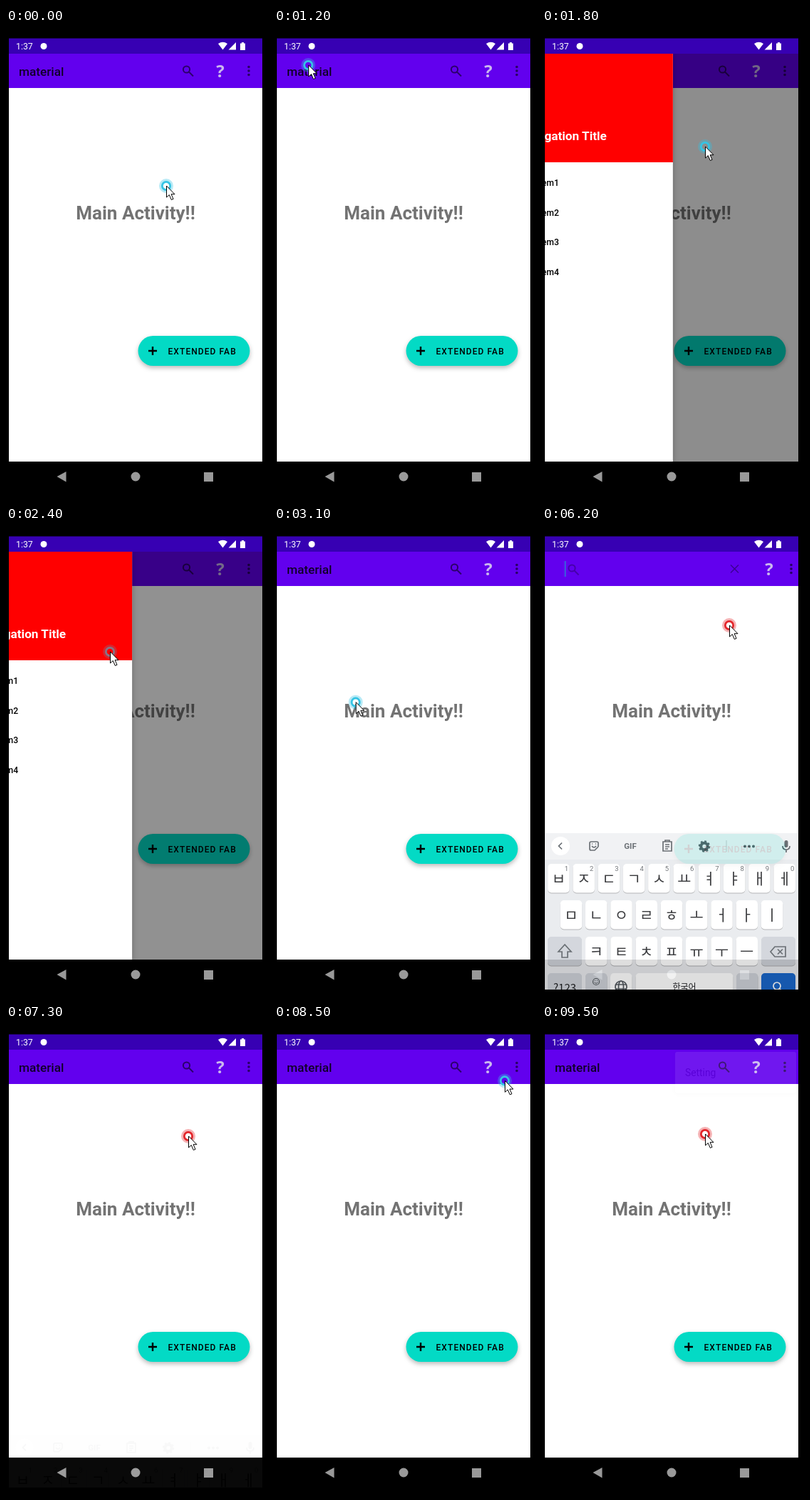
Recreate the animation shown at these times as an HTML page. Size 368 by 658 pixels, loop 9600 ms.

```html
<!DOCTYPE html>
<html lang="en">
<head>
<meta charset="utf-8">
<title>Material app demo</title>
<style>
  html, body { margin: 0; width: 100%; height: 100%; overflow: hidden; background: #000; }
  svg { display: block; width: 368px; height: 658px; font-family: Roboto, sans-serif; }
  .ko { font-family: "Noto Sans CJK KR", "Noto Sans CJK", sans-serif; font-weight: 500; }
  .line { fill: none; stroke: #555b61; stroke-width: 1.7; }
  .mid { text-anchor: middle; }
  #fab rect { filter: drop-shadow(0 3px 3px #0004); }
  #drawer, #popup { filter: drop-shadow(0 1px 4px #0004); }
  #keys .key { filter: drop-shadow(0 1px .5px #0004); }
</style>
</head>
<body>
<svg viewBox="0 0 368 658">
  <defs>
    <clipPath id="screen"><path d="M4 14H360V649H4Z"/></clipPath>
    <clipPath id="content"><path d="M4 36H360V607H4Z"/></clipPath>
    <g id="lens" fill="none" stroke="#000" stroke-width="2">
      <circle cx="-2" cy="-2" r="4.6"/><path d="M1.500 1.500L7.500 7.500"/>
    </g>
  </defs>
  <rect width="368" height="658"/>
  <g clip-path="url(#screen)">
    <path fill="#3700b3" d="M4 14.500H360V36H4Z"/>
    <g fill="#fff">
      <text x="14" y="30" font-size="12.300">1:37</text>
      <circle cx="53" cy="25.500" r="4.500"/>
      <path d="M298 22Q304.500 17.500 311 22L304.500 30.500ZM323 20V30.500H312.500ZM329 21.500H331V20H334V21.500H336V31H329Z"/>
    </g>
    <path fill="#6200ee" d="M4 36H360V84H4Z"/>
    <g id="bar">
      <text x="18" y="66.500" font-size="17.200" font-weight="500" opacity=".82">material</text>
      <use href="#lens" x="255.500" y="60" opacity=".55"/>
    </g>
    <g id="search">
      <path stroke="#03dac5" d="M32.500 49V71" opacity=".75"/>
      <use href="#lens" x="44" y="61" opacity=".28"/>
      <path d="M265 54.500L276 65.500M276 54.500L265 65.500" stroke="#000" stroke-width="1.500" opacity=".38"/>
    </g>
    <text id="help" class="mid" y="69" font-size="24" font-weight="700" fill="#cbb8ee" style="font-family:'Open Sans',sans-serif">?</text>
    <g id="dots" opacity=".58"><circle cy="54.500" r="1.800"/><circle cy="60" r="1.800"/><circle cy="65.500" r="1.800"/></g>
    <path fill="#fff" d="M4 84H360V607H4Z"/>
    <text class="mid" x="182" y="268" font-size="26" font-weight="700" fill="#737373">Main Activity!!</text>
    <g id="fab">
      <rect fill="#03dac5"/>
      <path id="plus" d="M-6 0H6M0-6V6" stroke="#000" stroke-width="2.400"/>
      <text x="227.500" y="457" font-size="12" font-weight="500" letter-spacing="1.07">EXTENDED FAB</text>
    </g>
    <path d="M4 607H360V649H4Z"/>
    <g fill="#999"><path d="M71.500 628L84.500 621V635.500ZM278 622H291V635H278Z"/><circle cx="182" cy="628" r="6.500"/></g>
    <g clip-path="url(#content)">
      <path id="scrim" d="M4 36H360V607H4Z"/>
      <g id="drawer">
        <path fill="#fff" d="M0 36H241V607H0Z"/>
        <path fill="#f00" d="M0 36H241V188H0Z"/>
        <text x="148" y="157" font-size="17.200" font-weight="700" fill="#fff" text-anchor="end">Navigation Title</text>
      </g>
    </g>
    <g id="popup">
      <rect x="187" y="39" width="170" height="58" rx="3" fill="#fff"/>
      <text x="201" y="73" font-size="13.800">Setting</text>
    </g>
    <g id="keys"><path fill="#e8eaed" d="M4 430H360V658H4Z"/><path fill="#f0f1f3" d="M4 430H360V467H4Z"/></g>
  </g>
  <g id="cursor">
    <g id="ring" fill="none"><circle r="7" stroke-width="6" opacity=".35"/><circle r="5.700" stroke-width="2.700"/></g>
    <path d="M.5 0V16L4.300 12.600L7.300 19.500L10 18.400L7.100 11.700H12Z" fill="#fff" stroke="#000" stroke-linejoin="round"/>
  </g>
</svg>
<script>
const LOOP = 9600, STEP = 100;
const el = id => document.getElementById(id);
const set = (node, attrs) => { for (const k in attrs) node.setAttribute(k, attrs[k]); };
const add = (parent, markup) => parent.insertAdjacentHTML("beforeend", markup);
const mix = (a, b, k) => a + (b - a) * k;
const ramp = (t, start, end) => Math.min(1, Math.max(0, (t - start) / (end - start)));
const pulse = (t, on, open, off, closed) => ramp(t, on, open) - ramp(t, off, closed);
const fab = el("fab"), pill = fab.querySelector("rect"), label = fab.querySelector("text");

// Places the pointer visits: time, x, y
const stops = [
  [0, 225, 221], [1100, 18, 33], [1800, 229, 166], [2200, 214, 176], [2400, 146, 176],
  [2900, 12, 120], [3500, 320, 500], [4500, 311, 448], [5100, 317, 454], [5800, 255, 60],
  [6200, 263, 139], [7100, 270, 60], [7300, 256, 157], [8800, 341, 60], [9500, 229, 154]
];

function pointerAt(t) {
  const i = Math.max(1, stops.findIndex(s => s[0] >= t));
  const [from, x0, y0] = stops[i - 1], [to, x1, y1] = stops[i], k = ramp(t, from, to);
  return [mix(x0, x1, k), mix(y0, y1, k)];
}

function key(x, y, w, text = "", fill = "#fff", size = 21) {
  add(el("keys"), `<rect class="key" x="${x}" y="${y}" width="${w}" height="40.5" rx="5" fill="${fill}"/>
    <text class="ko mid" x="${x + w / 2}" y="${y + 20 + size * .37}" font-size="${size}" fill="#202124">${text}</text>`);
}

function buildKeyboard() {
  const keys = el("keys"), grey = "#ced2d8", pitch = 35.25;
  ["ㅂㅈㄷㄱㅅㅛㅕㅑㅐㅔ", "ㅁㄴㅇㄹㅎㅗㅓㅏㅣ", "ㅋㅌㅊㅍㅠㅜㅡ"].forEach((row, r) =>
    [...row].forEach((letter, i) => {
      const x = 182 + (i - row.length / 2) * pitch + 2.4;
      key(x, 473 + r * 51, 30.5, letter);
      if (!r) add(keys, `<text x="${x + 23.5}" y="483" font-size="9.5" fill="#5f6368">${(i + 1) % 10}</text>`);
    }));
  for (const x of [8, 308]) key(x, 575, 48, "", grey);
  key(8, 626, 48, "?123", grey, 15);
  key(61, 626, 30.5, "", grey);
  key(96, 626, 30.5);
  key(131.5, 626, 137, "한국어", "#fff", 12);
  key(273, 626, 30.5, ".", grey);
  key(308, 626, 48, "", "#1a66c8");
  add(keys, `
    <circle cx="26" cy="448" r="13" fill="#fff"/>
    <g class="line">
      <path d="M28 443.500L23.500 448L28 452.500M32 586L23 596H28V604H36V596H41Z"/>
      <path d="M79 449V444Q79 442 77 442H69Q67 442 67 444V452Q67 454 69 454H74L79 449M70 448Q73 452 76 448M70 445H71M75 445H76"/>
      <path d="M170 442H182V455H170ZM173 442V440H179V442M173 446H179M173 449H179M173 452H177"/>
      <circle cx="228" cy="448.500" r="4.700" stroke-width="4"/>
      <circle cx="228" cy="448.500" r="7" stroke-width="2.500" stroke-dasharray="2.750"/>
      <path d="M259 440V456" stroke="#c4c7ca" stroke-width="1"/>
      <path d="M338 448Q338 453 343 453T348 448M343 453V457"/>
      <path d="M321 596L327 589H342V603H327ZM331 592.500L338 599.500M338 592.500L331 599.500"/>
      <circle cx="76" cy="638" r="4.500" stroke-width="1.200"/><path d="M73.500 639Q76 642 78.500 639M74 636.500H75M77 636.500H78" stroke-width="1"/>
      <circle cx="111" cy="645" r="8"/><ellipse cx="111" cy="645" rx="3.500" ry="8"/><path d="M103.500 642H118.500M103.500 648H118.500"/>
      <g stroke="#fff"><circle cx="330" cy="644" r="5"/><path d="M334 648L339 653"/></g>
    </g>
    <rect x="340.500" y="440" width="5" height="10" rx="2.500" fill="#555b61"/>
    <g fill="#555b61"><circle cx="285" cy="448.500" r="2"/><circle cx="291" cy="448.500" r="2"/><circle cx="297" cy="448.500" r="2"/></g>
    <text class="mid" x="124" y="452" font-size="11.500" font-weight="700" fill="#555b61">GIF</text>`);
}

function buildDrawer() {
  for (let i = 0; i < 4; i++)
    add(el("drawer"), `<text x="81" y="${221 + i * 41.7}" font-size="12.200" font-weight="500" text-anchor="end">Item${i + 1}</text>`);
}

function drawFab(collapsed) {
  const x = mix(185.5, 294, collapsed), h = mix(42, 48.5, collapsed);
  set(pill, { x, y: 431, width: 342.5 - x, height: h, rx: h / 2 });
  set(el("plus"), { transform: `translate(${mix(206, 318, collapsed)} ${431 + h / 2})` });
  set(label, { opacity: Math.max(0, 1 - 3 * collapsed) });
}

function draw(t) {
  const searching = t >= 5900 && t < 7200;
  set(el("bar"), { opacity: searching ? 0 : 1 });
  set(el("search"), { opacity: searching ? 1 : 0 });
  set(el("help"), { x: searching ? 319 : 301 });
  set(el("dots"), { transform: `translate(${searching ? 350 : 341})` });

  const collapsed = pulse(t, 3900, 4200, 4700, 5000);
  drawFab(collapsed);

  const open = pulse(t, 1300, 1970, 2200, 2910);
  set(el("scrim"), { opacity: .6 * open });
  set(el("drawer"), { transform: `translate(${4 + 241 * (open - 1)})`, opacity: open > 0 ? 1 : 0 });

  const leaving = ramp(t, 7100, 7307);
  set(el("keys"), { transform: `translate(0 ${150 * leaving})`, opacity: ramp(t, 6000, 6230) * (1 - leaving) });
  set(el("popup"), { opacity: pulse(t, 8800, 9000, 9400, 9510) });

  const clicked = t >= 5800 && t < 7600 || t >= 8700;
  set(el("cursor"), { transform: `translate(${pointerAt(t)})` });
  set(el("ring"), {
    stroke: clicked ? "#e3262b" : collapsed ? "#9af0f0" : "#35c4e4",
    opacity: 1 - .7 * collapsed - .4 * pulse(t, 2200, 2400, 2400, 2600)
  });
}

buildDrawer();
buildKeyboard();
function tick() {
  draw(Math.floor(performance.now() % LOOP / STEP) * STEP);
  requestAnimationFrame(tick);
}
tick();
</script>
</body>
</html>
```
